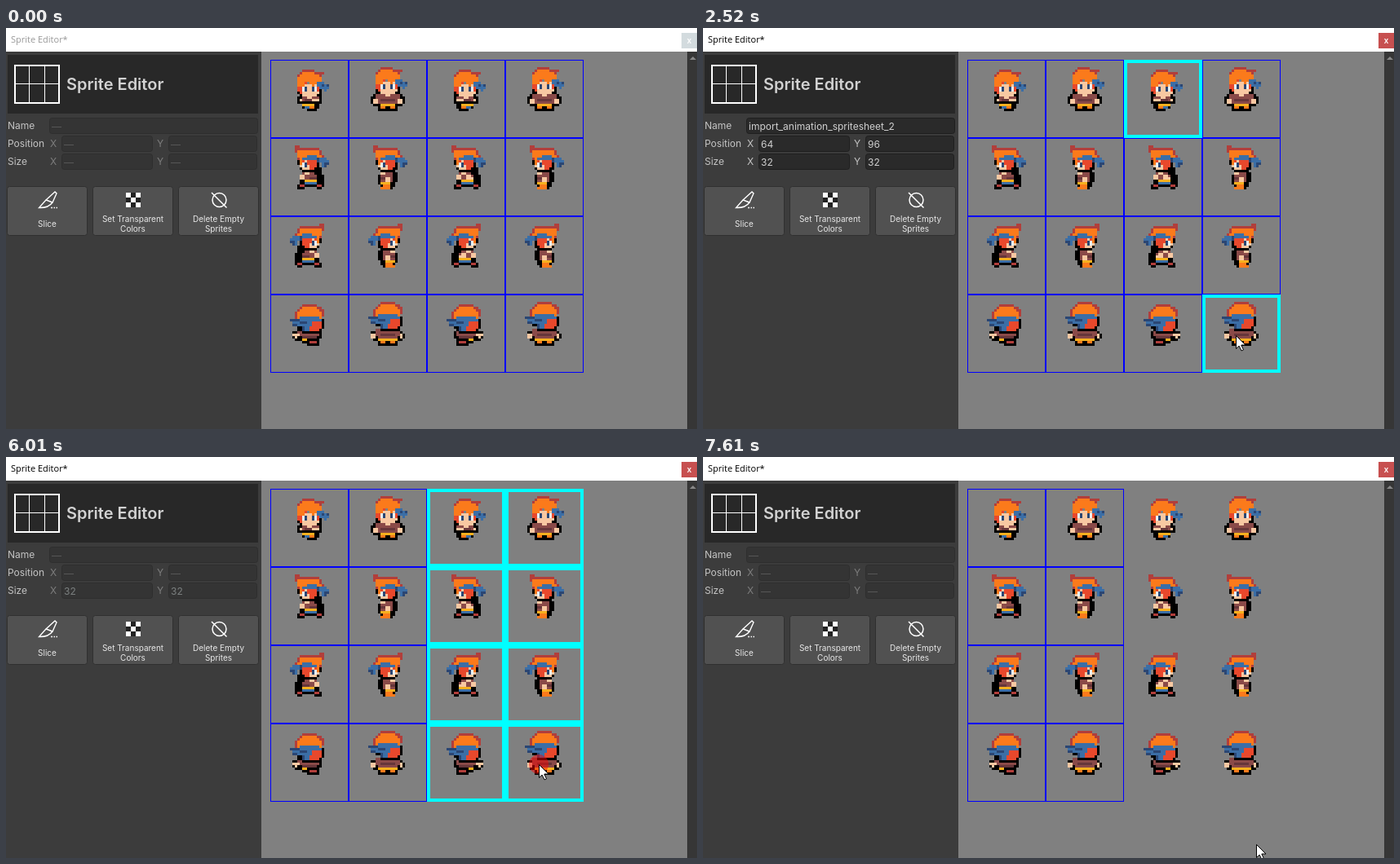
These frames come from a looping animation (847x492 px, 9350 ms). An HTML page with a canvas:

```html
<!DOCTYPE html>
<html lang="en">
<head>
<meta charset="utf-8">
<title>Sprite Editor</title>
<style>
html, body { margin: 0; width: 100%; height: 100%; overflow: hidden; background: #808080; }
canvas { display: block; }
</style>
</head>
<body>
<canvas id="stage" width="847" height="492"></canvas>
<script>
const g = document.getElementById('stage').getContext('2d');
const LOOP = 9350, CELL = 96, LEFT = 324, TOP = 39;
const UI = 'Inter, sans-serif', SYS = '"Open Sans", sans-serif';

// Sprite parts: one outline per colour, in sprite pixels, painted in order
const COLORS = {
  dark: '#b13e3b', black: '#000', orange: '#fb7a1b', red: '#e8482c', skin: '#f8c8a2',
  white: '#e8f4f8', blue: '#3b6ea6', navy: '#2b4673', vest: '#8a4a48', brown: '#66363a', gold: '#f7b01f'
};
const PARTS = {
  frontHead: {
    black: 'M4 6h9v4h-1v1H4v-1H3V8h1z',
    dark: 'M5 0h5v1h4v1h-1v2H3V2h1V1h1z',
    skin: 'M5 6h7v4h-1v1H5z',
    orange: 'M5 1h5v1h2v1h1v2h-1v1h-2v1H9V6H8V5H7v1H6v1H5v1H3V3h1V2h1z',
    red: 'M3 7h1v2H3zM4 7h1v3H4zM6 5h1v1H6zM11 6h1v3h-1z',
    blue: 'M11 5h3v1h2v2h-1v1h-1V8h-2V7h-1z',
    navy: 'M13 6h1v1h-1zM15 6h1v1h-1zM6 7h1v2H6zM9 7h1v2H9z',
    white: 'M5 7h1v2H5zM10 7h1v2h-1z'
  },
  frontStand: {
    black: 'M3 10h10v1h1v1h1v3h-1v1h-2v2H4v-2H2v-1H1v-3h1v-1h1z',
    vest: 'M3 11h10v2h1v1h-2v1H4v-1H2v-1h1z',
    brown: 'M5 13h6v1H5z',
    skin: 'M2 13h2v2H2zM12 13h2v2h-2zM7 11h2v1H7z',
    gold: 'M5 15h6v1H5z',
    orange: 'M5 16h2v1H5zM9 16h2v1H9z'
  },
  frontWalk: {
    black: 'M4 10h8v1h1v4h-1v2h-1v1H7v-1H5v-2H3v-3h1z',
    vest: 'M5 12h7v2H5z',
    brown: 'M6 13h3v1H6z',
    skin: 'M9 13h3v1H9zM4 13h1v1H4zM7 12h2v1H7z',
    gold: 'M5 15h5v1H5z',
    blue: 'M6 16h2v1H6z',
    orange: 'M8 16h2v1H8z'
  },
  sideHead: {
    black: 'M3 5h9v5h-1v1H5v-1H4V8H3z',
    dark: 'M2 0h2v1h8v1h1v2h1v2H3V3H2z',
    orange: 'M3 2h9v2h1v3H5v1H4V5H3z',
    skin: 'M5 6h4v4H5V9H4V8h1z',
    red: 'M8 6h3v3h-1v1H8V8H7V6zM5 5h1v2H5z',
    blue: 'M5 5h2V4h4v1h4v1h1v2h-2v1h-1V7h-2V6H5z',
    navy: 'M11 5h1v2h-1zM14 7h2v1h-1v1h-1zM6 7h1v2H6z',
    white: 'M5 7h1v2H5z'
  },
  sideStand: {
    black: 'M5 10h6v1h1v4h-1v2h-1v1H5v-2H4v-4h1z',
    vest: 'M5 11h5v4H5z',
    brown: 'M5 13h2v1H5z',
    skin: 'M7 13h2v2H7zM5 11h2v1H5z',
    gold: 'M5 15h4v1H5z',
    orange: 'M6 16h3v1H6zM5 17h4v1H5z'
  },
  sideWalk: {
    black: 'M5 10h6V9h2v3h1v5h-1v1h-2v-1H6v1H3v-2h1v-4h1z',
    vest: 'M5 11h5v1h1v2H5z',
    brown: 'M8 13h3v1H8z',
    skin: 'M4 12h2v2H4zM6 11h2v1H6z',
    gold: 'M6 14h5v1H6z',
    blue: 'M6 15h5v1H6z',
    dark: 'M4 16h2v1H4zM11 16h2v1h-2z'
  },
  sideArm: { skin: 'M8 12h2v1h1v1H8z' },
  backHead: {
    black: 'M3 6h11v4h-1v2H5v-2H3z',
    dark: 'M5 0h6v1h2v1h1v3h-1v1H2V3h1V2h1V1h1z',
    orange: 'M5 1h6v1h1v1h1v4H3V3h1V2h1z',
    red: 'M7 6h6v4h-1v1H7z',
    blue: 'M4 5h8v1h1v1H9v2H8v2H5V9H1V7H0V6h4z',
    navy: 'M0 6h4v1H0zM4 7h3v1H4zM1 8h2v1H1zM5 9h1v2H5z'
  },
  backStand: {
    black: 'M3 11h10v1h1v1h1v2h-1v1h-2v2H4v-2H2v-1H1v-3h2z',
    vest: 'M3 11h10v2h1v1h-2v1H4v-1H2v-1h1z',
    brown: 'M5 13h6v1H5z',
    skin: 'M1 13h2v2H1zM13 13h1v2h-1z',
    gold: 'M4 15h8v1H4z',
    orange: 'M5 16h2v1H5zM9 16h2v1H9z'
  },
  backWalk: {
    black: 'M3 11h9v1h1v3h-1v3H7v-1H5v-1H2v-1H1v-3h2z',
    vest: 'M3 12h9v2H4v-1H3z',
    brown: 'M5 14h6v1H5z',
    skin: 'M1 13h3v1H1zM2 14h1v1H2z',
    gold: 'M5 15h2v1H5z',
    dark: 'M8 16h3v1H8z'
  }
};
for (const part of Object.values(PARTS))
  for (const c in part) part[c] = new Path2D(part[c]);

function box(x, y, w, h, color) {
  g.fillStyle = color;
  g.fillRect(x, y, w, h);
}
function frame(x, y, w, h, color, width) {
  g.strokeStyle = color;
  g.lineWidth = width;
  g.strokeRect(x + width / 2, y + width / 2, w - width, h - width);
}
function panel(x, y, w, h, fill, edge) {
  g.beginPath();
  g.roundRect(x + .5, y + .5, w - 1, h - 1, 3);
  g.fillStyle = fill;
  g.fill();
  g.strokeStyle = edge;
  g.lineWidth = 1;
  g.stroke();
}
function text(s, x, y, font, color, align = 'left') {
  g.font = font;
  g.fillStyle = color;
  g.textAlign = align;
  g.fillText(s, x, y);
}
function line(path, color, width) {
  g.strokeStyle = color;
  g.lineWidth = width;
  g.stroke(new Path2D(path));
}

function drawPart(name, dy, flip) {
  g.save();
  if (flip) { g.translate(16, 0); g.scale(-1, 1); }
  g.translate(0, dy);
  for (const c in PARTS[name]) {
    g.fillStyle = COLORS[c];
    g.fill(PARTS[name][c]);
  }
  g.restore();
}
function drawSprite(col, row) {
  const view = ['front', 'side', 'side', 'back'][row];
  const side = view === 'side', walk = col % 2 === 0, flip = row === 2;
  g.save();
  g.translate(LEFT + col * CELL + 24, TOP + row * CELL + 9);
  g.scale(3, 3);
  drawPart(view + (walk ? 'Walk' : 'Stand'), 0, side ? flip : col === 2);
  if (side && col === 2) drawPart('sideArm', 0, flip);
  drawPart(view + 'Head', walk && !side ? 1 : 0, flip);
  g.restore();
}

// Pointer moves: start, end, from, to, easing
const out = k => p => 1 - (1 - p) ** k;
const smooth = p => p * p * (3 - 2 * p);
const MOVES = [
  [280, 1000, [845, 451], [593, 127], out(1.4)],
  [1000, 1210, [593, 127], [571, 112], out(1.7)],
  [1880, 2520, [571, 112], [653, 377], smooth],
  [6170, 6500, [653, 377], [675, 405], smooth],
  [6500, 6670, [675, 405], [677, 408], out(2)],
  [7210, 7610, [677, 408], [678, 475], smooth]
];
function pointer(t) {
  if (t < 280) return null;
  const [start, end, a, b, ease] = MOVES.filter(m => m[0] <= t).pop();
  const p = ease(Math.min(1, (t - start) / (end - start)));
  return a.map((v, i) => v + (b[i] - v) * p);
}

const CLICKS = [
  [1580, 1720, '255,255,0'], [4380, 4490, '255,255,0'],
  [6010, 6130, '255,0,0'], [7100, 7210, '255,255,0']
];
const PICK = 1650, PICK_ALL = 4430, MENU = 6130, REMOVE = 7170;

function field(x, y, w, value, on) {
  panel(x, y, w, 20, on ? '#2a2a2a' : '#343434', on ? '#1f1f1f' : '#2e2e2e');
  text(value, x + 3, y + 15, '12px ' + UI, on ? '#d0d0d0' : value === '—' ? '#585858' : '#7c8080');
}
function drawFields(t) {
  const one = t >= PICK && t < PICK_ALL, many = t >= PICK_ALL && t < REMOVE;
  const size = one || many ? '32' : '—', font = '12px ' + UI;
  ['Name', 'Position', 'Size'].forEach((s, i) => text(s, 2, 124 + 22 * i, font, '#c4c4c4'));
  for (const y of [146, 168]) {
    const color = one ? '#c4c4c4' : '#7d7d7d';
    text('X', 54, y, font, color);
    text('Y', 185, y, font, color);
  }
  field(53, 110, 256, one ? 'import_animation_spritesheet_2' : '—', one);
  field(68, 132, 112, one ? '64' : '—', one);
  field(199, 132, 109, one ? '96' : '—', one);
  field(68, 154, 112, size, one);
  field(199, 154, 109, size, one);
}
function drawButtons() {
  [['Slice'], ['Set Transparent', 'Colors'], ['Delete Empty', 'Sprites']].forEach((rows, i) => {
    const x = 1 + 105 * i;
    panel(x, 194, 99, 61, '#515151', '#303030');
    rows.forEach((s, j) =>
      text(s, x + 49.5, rows[1] ? 238 + 12 * j : 244, '10px ' + UI, '#e8e8e8', 'center'));
  });
  line('M49 211L60 201L62 203L57 214zM49 211L40.5 220.5Q52 221 57 214M55 220.5h2M58.5 220.5h1.5M61.5 220.5h1.5', '#fff', 1.4);
  box(147, 202, 18, 18, '#222');
  for (let i = 0; i < 9; i += 2) box(147 + i % 3 * 6, 202 + Math.floor(i / 3) * 6, 6, 6, '#fff');
  line('M270 211a8.5 8.5 0 1 1 -17 0a8.5 8.5 0 1 1 17 0M252 202L270.5 220.5', '#fff', 1.5);
}
function drawChrome(t) {
  const active = t >= 1600;
  box(0, 0, 847, 29, '#fff');
  text('Sprite Editor*', 6, 18, '11px ' + SYS, active ? '#000' : '#999');
  box(828, 6, 19, 19, active ? '#c75050' : '#d3dbde');
  text('x', 837.5, 19, '600 10px ' + SYS, '#fff', 'center');
  box(0, 29, 313, 463, '#3c3c3c');
  box(2, 33, 307, 72, '#282828');
  frame(10, 45, 56, 48, '#fff', 2);
  line('M28.5 46V92M47.5 46V92M11 68.5H65', '#fff', 1);
  text('Sprite Editor', 74, 76, '600 20px ' + UI, '#d2d2d2');
  box(835, 29, 12, 463, '#363636');
  g.fillStyle = '#888';
  g.fill(new Path2D('M838 39l4-4 4 4z'));
}

function drawSheet(t) {
  const cols = t < REMOVE ? 4 : 2;
  const seen = pointer(t - 65);
  const hx = seen ? Math.floor((seen[0] - LEFT) / CELL) : -1;
  const hy = seen ? Math.floor((seen[1] - TOP) / CELL) : -1;
  const lit = (c, r) => c === hx && r === hy ||
    t >= PICK && t < PICK_ALL && c === 2 && r === 0 ||
    t >= PICK_ALL && c > 1;
  box(313, 29, 522, 463, '#808080');
  for (let r = 0; r < 4; r++)
    for (let c = 0; c < 4; c++) {
      const on = lit(c, r);
      drawSprite(c, r);
      if (c < cols) frame(LEFT + c * CELL, TOP + r * CELL, CELL, CELL, on ? '#0ff' : '#00f', on ? 4 : 1);
    }
}
function drawMenu([x, y]) {
  box(655, 380, 124, 50, 'rgba(0,0,0,.22)');
  box(652, 377, 124, 50, '#f2f2f2');
  frame(652, 377, 124, 50, '#ccc', 1);
  if (x >= 655 && y >= 380) box(655, y < 402 ? 380 : 402, 118, 22, '#91c9f7');
  text('Merge', 687, 395, '11px ' + SYS, '#000');
  text('Delete', 687, 417, '11px ' + SYS, '#000');
}
function drawPointer(t, [x, y]) {
  const click = CLICKS.find(c => t >= c[0] && t < c[1]);
  if (click) {
    g.fillStyle = `rgba(${click[2]},.47)`;
    g.beginPath();
    g.arc(x, y, 12, 0, 7);
    g.fill();
  }
  g.save();
  g.translate(Math.round(x) + .5, Math.round(y) + .5);
  const arrow = new Path2D('M0 0V16L3.6 12.6L6.5 18.5L9 17.3L6.3 11.5H11.5z');
  g.fillStyle = '#fff';
  g.fill(arrow);
  g.strokeStyle = '#000';
  g.lineWidth = 1;
  g.stroke(arrow);
  g.restore();
}

function draw(t) {
  const at = pointer(t);
  drawSheet(t);
  drawChrome(t);
  drawFields(t);
  drawButtons();
  if (t >= 3510 && t < 6010) {
    box(372, 440, 104, 52, '#fff');
    text('Shift', 424, 480, '700 35px ' + SYS, '#000', 'center');
  }
  if (t >= MENU && t < REMOVE) drawMenu(at);
  if (at) drawPointer(t, at);
}
function tick() {
  draw(performance.now() % LOOP);
  requestAnimationFrame(tick);
}
tick();
</script>
</body>
</html>
```
